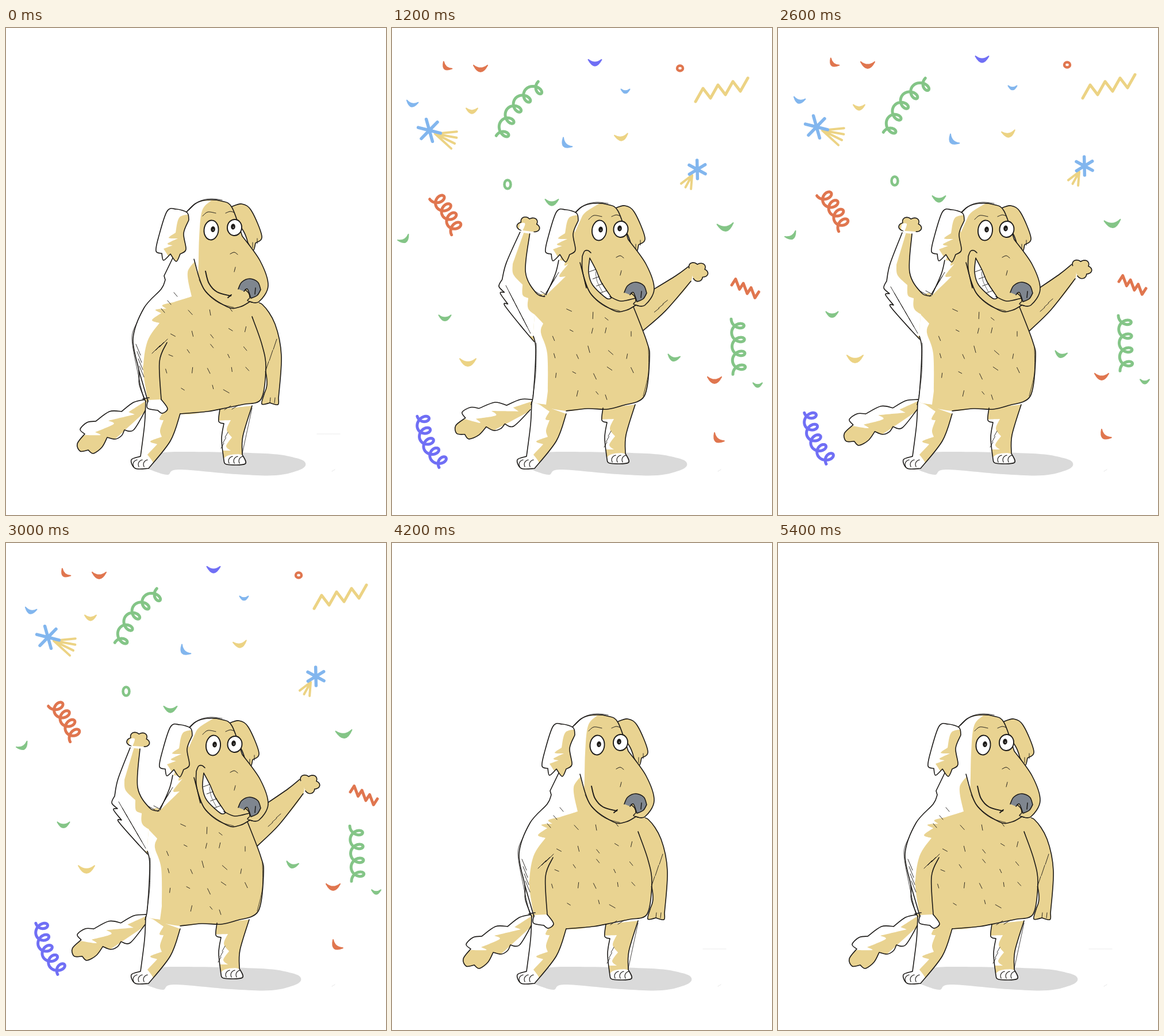
An HTML page with a canvas that plays this animation: 661x847 px, repeating every 5.6 s.

```html
<!DOCTYPE html>
<html lang="en">
<head>
<meta charset="utf-8">
<title>Happy dog</title>
<style>
html, body { margin: 0; width: 100%; height: 100%; overflow: hidden; background: #fff; }
canvas { display: block; }
</style>
</head>
<body>
<canvas id="stage" width="661" height="847"></canvas>
<script>
const ctx = document.getElementById('stage').getContext('2d');
const STEP = 200, STEPS = 28, TAU = Math.PI * 2;
const INK = '#1c1a18', FUR = '#e9d391', WHITE = '#fff', NOSE = '#7f868f', GREY = '#dadada';
const RED = '#e0764f', GREEN = '#84c587', BLUE = '#82b6ee', PURPLE = '#706ff5', YELLOW = '#ecd384';

// Smooth curve through points; "/" makes a corner, "|" starts a new stroke.
function curve(text) {
  const path = new Path2D();
  for (const stroke of text.split('|')) {
    let last = null;
    for (const piece of stroke.split('/')) {
      const n = piece.trim().split(/\s+/).map(Number);
      const p = last ? [last] : [];
      for (let i = 0; i < n.length; i += 2) p.push([n[i], n[i + 1]]);
      if (!last) path.moveTo(...p[0]);
      for (let i = 0; i < p.length - 1; i++) {
        const a = p[i - 1] || p[i], b = p[i], c = p[i + 1], d = p[i + 2] || c;
        path.bezierCurveTo(b[0] + (c[0] - a[0]) / 6, b[1] + (c[1] - a[1]) / 6,
          c[0] - (d[0] - b[0]) / 6, c[1] - (d[1] - b[1]) / 6, c[0], c[1]);
      }
      last = p[p.length - 1];
    }
  }
  return path;
}

const cache = {};
const get = text => cache[text] || (cache[text] = curve(text));

function fill(text, color) {
  ctx.fillStyle = color;
  ctx.fill(get(text));
}

function line(text, width = 1.6, color = INK) {
  ctx.strokeStyle = color;
  ctx.lineWidth = width;
  ctx.stroke(get(text));
}

// Filled shape with patches of a second colour kept inside it.
function part(text, color, patches, patchColor = WHITE) {
  fill(text, color);
  if (patches) {
    ctx.save();
    ctx.clip(get(text));
    patches.split('|').forEach(p => fill(p, patchColor));
    ctx.restore();
  }
  line(text);
}

function moved(dx, dy, draw) {
  ctx.save();
  ctx.translate(dx, dy);
  draw();
  ctx.restore();
}

function turned(x, y, angle, draw) {
  moved(x, y, () => {
    ctx.rotate(angle);
    moved(-x, -y, draw);
  });
}

function oval(x, y, rx, ry, color, outline) {
  ctx.beginPath();
  ctx.ellipse(x, y, rx, ry, 0.1, 0, TAU);
  ctx.fillStyle = color;
  ctx.fill();
  if (!outline) return;
  ctx.strokeStyle = INK;
  ctx.lineWidth = 1.9;
  ctx.stroke();
}

function eye(x, y, ry, look) {
  oval(x, y, 12.5, ry, WHITE, true);
  oval(x + look, y - 1.5, 3.8, 5, INK);
  oval(x + look + 0.5, y - 0.5, 0.9, 1.3, '#999');
}

// Short hairs on a loose grid inside the belly.
function hairs(seed, cx, cy) {
  const rnd = () => (seed = seed * 16807 % 2147483647) / 2147483647;
  ctx.beginPath();
  for (let r = -2; r <= 2; r++) {
    for (let c = -2; c <= 2; c++) {
      const x = cx + c * 34 + rnd() * 20 - 10, y = cy + r * 34 + rnd() * 20 - 10;
      const a = 1.1 + (rnd() - 0.5) * 1.6, d = 3 + rnd() * 3;
      if (Math.abs(r * c) === 4) continue;
      ctx.moveTo(x - d * Math.cos(a), y - d * Math.sin(a));
      ctx.lineTo(x + d * Math.cos(a), y + d * Math.sin(a));
    }
  }
  ctx.strokeStyle = INK;
  ctx.lineWidth = 0.9;
  ctx.stroke();
}

// Slanted strokes along an edge.
function shade(x0, y0, x1, y1, count, dx, dy) {
  ctx.beginPath();
  for (let i = 0; i < count; i++) {
    const s = i / (count - 1), x = x0 + (x1 - x0) * s, y = y0 + (y1 - y0) * s;
    ctx.moveTo(x, y);
    ctx.lineTo(x + dx, y + dy);
  }
  ctx.strokeStyle = INK;
  ctx.lineWidth = 0.9;
  ctx.stroke();
}

function toes(x, y) {
  ctx.lineWidth = 1.2;
  ctx.strokeStyle = INK;
  for (let i = 0; i < 3; i++) {
    ctx.beginPath();
    ctx.arc(x + i * 9, y, 8, 2.6, 4.6);
    ctx.stroke();
  }
}

function tail(angle) {
  turned(243, 655, angle, () => part(
    '243 646 222 651 201 667 / 180 667 156 684 / 141 686 129 698 137 706 / 124 723 129 736 143 734 / 152 740 167 729 176 712 / 190 715 201 709 206 699 / 222 699 243 664',
    WHITE,
    '244 648 213 668 / 224 672 / 178 683 / 187 689 155 703 / 164 708 137 708 / 118 725 150 745 246 664', FUR));
}

function legs(dx, dy) {
  part('243 650 241 690 234 745 / 218 751 225 766 248 766 / 286 718 303 671', FUR,
    '235 640 274 667 / 267 680 274 682 / 268 700 271 711 / 251 719 263 724 / 246 742 / 256 757 252 770 205 770');
  toes(229, 759);
  moved(dx, dy, () => {
    part('372 663 370 684 379 688 / 375 715 379 752 / 384 759 416 758 411 742 / 412 710 428 657', FUR,
      '365 683 391 682 / 384 699 393 712 / 383 727 391 735 / 375 735|375 752 388 743 412 743 425 760 376 762');
    toes(395, 753);
    shade(386, 703, 379, 722, 3, -5, 9);
  });
}

function nearEar() {
  part('318 334 315 321 296 315 280 319 265 365 261 388 271 392 / 274 404 286 393 / 296 406 303 393 / 313 385 309 357 318 334', WHITE,
    '325 324 302 329 295 356 / 283 365 299 366 / 281 375 290 378 / 274 384 / 293 407 318 400', FUR);
}

function farEar() {
  part('392 311 410 306 427 318 445 362 434 374 / 430 387 421 374 / 414 355 394 325', FUR);
  shade(429, 373, 437, 366, 2, 0, 9);
}

const face = '313 321 330 305 350 299 375 301 393 312 411 362 / 442 405 456 448 440 476 424 476 / 407 485 385 485 345 455 327 402';

function head(white) {
  fill(face + ' / 292 398', FUR);
  fill(white, WHITE);
  line(face);
  line('318 317 335 302 355 297 376 299|336 438 348 460 370 478 396 486', 0.8);
  line('342 327 351 320 365 322|382 322 390 319 397 321|390 393 397 390 403 394|399 416 397 424', 1);
  part('404 454 410 442 424 436 438 442 443 455 / 437 465 426 470 / 420 454 414 458', NOSE);
  line('416 455 422 461 424 469 420 474 428 477|434 452 433 463', 1.5);
}

function shadow(dx) {
  moved(dx, 0, () => fill('248 742 300 737 450 740 505 748 521 757 512 768 470 778 400 776 300 768 280 777 245 766', GREY));
  line('567 771 572 768', 0.8, '#ddd');
}

function standing(high) {
  shadow(0);
  line('541 706 581 706', 0.8, '#e6e6e6');
  tail(high ? 0.27 : 0);

  part('428 478 446 481 468 515 479 570 474 644 / 473 655 459 652 / 445 654 449 637 / 453 605 428 502', FUR);
  shade(460, 643, 468, 643, 2, -1, 9);

  const left = '292 396 275 431 / 277 438 / 270 454 240 487 221 540 231 595 232 620 243 650';
  const right = '303 671 350 667 382 661 416 654 / 444 645 452 590 445 550 428 502';
  const torso = left + ' / ' + right + ' / 440 478 400 390';
  fill(torso, FUR);
  ctx.save();
  ctx.clip(get(torso));
  fill('285 390 332 396 316 425 323 467 / 291 477 / 272 482 279 488 / 260 490 270 496 / 254 508 267 513 / 246 545 239 595 247 645 / 190 640 190 490 275 420', WHITE);
  ctx.restore();
  legs(0, 0);
  line(left);
  line(right);
  line('228 512 219 540 229 598 240 647|428 661 411 740', 0.8);

  fill('246 560 270 552 266 610 274 650 250 655 238 590', FUR);
  part('247 647 246 661 264 665 / 272 670 281 662 270 646', WHITE);
  line('280 547 267 580 270 646|231 595 247 650|238 645 249 643');
  shade(281, 541, 268, 552, 3, -14, 14);
  shade(226, 550, 232, 588, 4, 8, 19);
  shade(471, 541, 457, 580, 3, -6, 18);
  shade(404, 656, 391, 657, 2, -11, 7);
  shade(292, 460, 270, 488, 3, 6, 7);
  hairs(7, 350, 562);

  farEar();
  head('311 322 330 304 357 300 / 341 318 336 365 334 426 327 404 / 290 400');
  line('347 423 353 444 367 459 391 466|386 469 392 464', 1.9);
  eye(357, 351.5, 17, 3);
  eye(397.5, 347, 14, -2.5);
  nearEar();
}

function hand(x, y, from) {
  ctx.beginPath();
  for (let i = 0; i <= 48; i++) {
    const a = from + i / 48 * 4.6, r = 15 + 5 * Math.abs(Math.sin((a - from) * 2.73));
    ctx.lineTo(x + r * Math.cos(a), y + r * 0.85 * Math.sin(a));
  }
  ctx.fillStyle = FUR;
  ctx.fill();
  ctx.strokeStyle = INK;
  ctx.lineWidth = 1.6;
  ctx.stroke();
}

function party(phase) {
  const lift = [0, 1, 0, -1][phase] * 0.05;
  shadow(-8);
  tail(phase % 2 ? 0.25 : 0.145);

  const upper = '446 458 490 428 511 411', lower = '517 436 475 490 437 527';
  turned(432, 500, lift, () => {
    fill(upper + ' / ' + lower + ' / 420 485', FUR);
    line(upper);
    line(lower);
    hand(526, 419, 3.6);
    shade(456, 493, 470, 478, 3, 8, -7);
  });

  const outer = '216 356 195 410 189 440 / 184 452 194 462 / 187 464 201 482 / 196 485 232 526 250 545';
  const inner = '268 466 250 461 229 425 233 358';
  turned(240, 490, lift, () => {
    const arm = outer + ' / 290 530 / ' + inner;
    fill(arm, FUR);
    ctx.save();
    ctx.clip(get(arm));
    fill('224 352 206 412 / 208 430 225 447 / 226 465 236 470 / 238 490 264 510 262 540 / 165 500 205 355', WHITE);
    ctx.restore();
    line(outer);
    line(inner);
    hand(230, 345, 2.5);
    fill('214 350 216 341 224 341 220 354', WHITE);
    shade(196, 450, 228, 505, 6, 15, 26);
    shade(246, 457, 257, 457, 2, 13, 7);
  });

  const left = '290 404 284 428 268 464', side = '246 536 250 560 246 635 242 655';
  const right = '303 666 340 662 375 663 403 656 / 439 640 448 575 443 545 420 485';
  const torso = left + ' / 248 500 / ' + side + ' / ' + right + ' / 400 390';
  fill(torso, FUR);
  ctx.save();
  ctx.clip(get(torso));
  fill('285 400 304 399 / 300 413 307 410 / 291 431 302 432 / 268 465|240 490 263 514 / 259 530 270 566 271 632 / 268 655 / 230 650', WHITE);
  ctx.restore();
  legs(-5, -2);
  [left, side, right].forEach(s => line(s));
  line('251 548 250 600 245 640|446 555 446 600 437 640', 0.8);
  shade(290, 425, 278, 445, 4, -14, 22);
  hairs(23, 347, 568);

  moved(-5, 3, farEar);
  moved(0, 6, () => head('313 321 330 304 363 298 / 336 315 327 330 318 350'));
  line('331 397 335 388 341 387 346 391|331 397 331 420 338 452');
  part('344 400 342 425 349 447 373 470 382 469 / 364 442 355 421 344 400', WHITE);
  shade(343, 424, 362, 461, 4, 11, -4);
  line('354 424 357 441 366 459', 0.9, '#555');
  line('379 467 398 475 423 470');
  eye(360.5, 352, 17.5, 2.5);
  eye(398, 350, 14, -2);
  moved(6, 1, nearEar);
}

function crescent(x, y, w, tilt, color) {
  turned(x, y, tilt, () => {
    ctx.beginPath();
    ctx.moveTo(x - w / 2, y - w * 0.17);
    ctx.quadraticCurveTo(x, y + w * 0.22, x + w / 2, y - w * 0.17);
    ctx.quadraticCurveTo(x, y + w * 0.75, x - w / 2, y - w * 0.17);
    ctx.fillStyle = ctx.strokeStyle = color;
    ctx.lineWidth = 2;
    ctx.fill();
    ctx.stroke();
  });
}

function ring(x, y, rx, ry, color) {
  ctx.beginPath();
  ctx.ellipse(x, y, rx, ry, 0, 0, TAU);
  ctx.strokeStyle = color;
  ctx.lineWidth = 4.5;
  ctx.stroke();
}

// Looping streamer along a bent line.
function coil(x0, y0, x1, y1, bend, loops, color) {
  const dx = x1 - x0, dy = y1 - y0, len = Math.hypot(dx, dy);
  const ux = dx / len, uy = dy / len;
  ctx.beginPath();
  for (let i = 0; i <= 160; i++) {
    const s = i / 160, a = s * loops * TAU;
    const along = s * len + 9 * Math.sin(a);
    const side = bend * 4 * s * (1 - s) + 11 * Math.cos(a);
    ctx.lineTo(x0 + ux * along - uy * side, y0 + uy * along + ux * side);
  }
  ctx.strokeStyle = color;
  ctx.lineWidth = 5;
  ctx.stroke();
}

function zigzag(x0, y0, x1, y1, amp, color) {
  ctx.beginPath();
  for (let i = 0; i < 8; i++) {
    ctx.lineTo(x0 + (x1 - x0) * i / 7, y0 + (y1 - y0) * i / 7 + (i % 2 ? -amp : amp));
  }
  ctx.strokeStyle = color;
  ctx.lineWidth = 5;
  ctx.stroke();
}

function rays(x, y, r, count, from, step, color) {
  ctx.beginPath();
  for (let i = 0; i < count; i++) {
    const a = from + i * step;
    ctx.moveTo(x, y);
    ctx.lineTo(x + r * Math.cos(a), y + r * Math.sin(a));
  }
  ctx.strokeStyle = color;
  ctx.lineWidth = color === BLUE ? 5.5 : 4;
  ctx.stroke();
}

const bits = [
  [97, 61, 19, 0.7, RED], [156, 63, 24, 0, RED], [563, 605, 24, 0, RED], [569, 708, 22, 0.7, RED],
  [408, 103, 15, 0, BLUE], [37, 125, 20, 0.2, BLUE], [305, 195, 22, 0.8, BLUE],
  [141, 137, 20, 0, YELLOW], [401, 183, 23, -0.15, YELLOW], [134, 574, 28, 0, YELLOW],
  [280, 296, 23, 0, GREEN], [582, 339, 28, -0.1, GREEN], [23, 361, 21, -0.5, GREEN],
  [94, 497, 21, 0, GREEN], [492, 567, 21, 0.2, GREEN], [638, 614, 16, 0, GREEN],
  [355, 53, 23, 0, PURPLE]
];
const drift = [[0, 0], [-2, 6], [6, -8], [0, -19]];

function confetti() {
  bits.forEach(b => crescent(...b));
  ring(503, 64, 5, 4.5, RED);
  ring(203, 266, 5.5, 7.5, GREEN);
  coil(265, 94, 192, 188, 14, 5, GREEN);
  coil(77, 286, 115, 348, -4, 4, RED);
  coil(56, 665, 94, 754, 12, 5, PURPLE);
  coil(603, 500, 606, 596, 0, 4, GREEN);
  zigzag(530, 112, 621, 91, 10, YELLOW);
  zigzag(593, 434, 640, 460, 7, RED);
  rays(77, 178, 38, 4, -0.1, 0.28, YELLOW);
  rays(524, 250, 24, 3, 1.65, 0.42, YELLOW);
  rays(67, 172, 20, 6, 0.25, TAU / 6, BLUE);
  rays(533, 240, 16, 6, 0.5, TAU / 6, BLUE);
}

function draw(n) {
  ctx.fillStyle = WHITE;
  ctx.fillRect(0, 0, 661, 847);
  ctx.lineCap = ctx.lineJoin = 'round';
  if (n >= 4 && n < 19) {
    const phase = (n + 3) % 4;
    moved(...drift[phase], confetti);
    party(phase);
  } else {
    standing(n < 4 ? n % 2 === 1 : n % 2 === 0);
  }
}

let shown = 0;
const start = performance.now();
function tick(now) {
  const n = Math.floor(Math.max(0, now - start) / STEP) % STEPS;
  if (n !== shown) draw(shown = n);
  requestAnimationFrame(tick);
}
draw(0);
requestAnimationFrame(tick);
</script>
</body>
</html>
```
